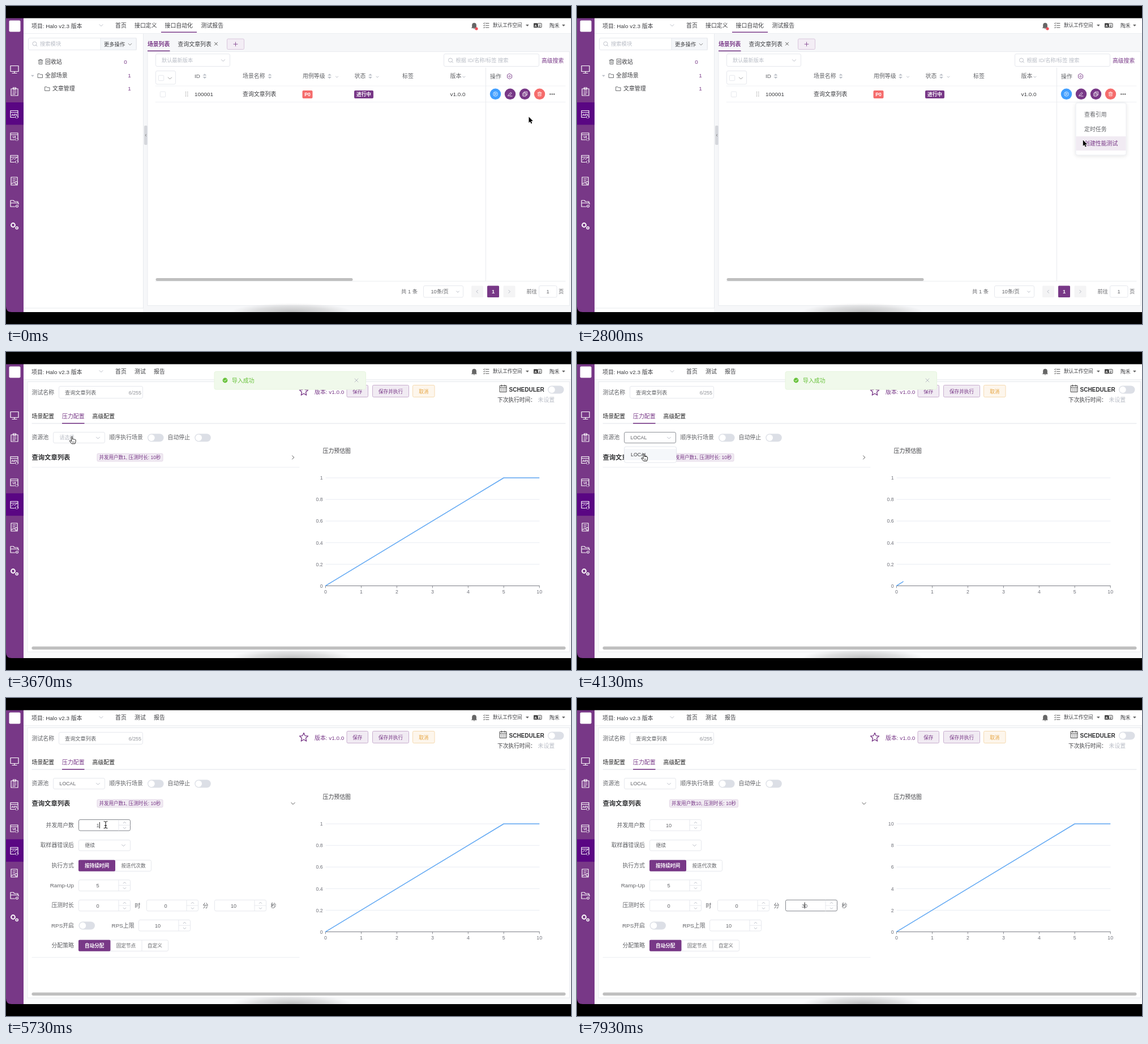
An HTML page that plays this animation: 998 by 561 pixels, repeating every 8 s.

```html
<!DOCTYPE html>
<html lang="zh-CN">
<head>
<meta charset="utf-8">
<title>性能测试</title>
<style>
html,body{margin:0;width:100%;height:100%;overflow:hidden;background:#fff}
svg{display:block;width:100vw;height:100vh}
text{font-family:"Liberation Sans","Noto Sans CJK SC","Noto Sans CJK JP","Noto Sans CJK",sans-serif;white-space:pre}
</style>
</head>
<body>
<svg id="stage" viewBox="0 0 998 561"></svg>
<script>
const LOOP = 8000, FPS = 15;
const PURPLE = '#783887', INK = '#3c3d40', GREY = '#606266', PALE = '#b9bdc6', EDGE = '#e6e8ed';

// Markup helpers
const T = (x, cy, s, o = {}) => {
  const z = o.z || 9.9;
  return `<text x="${x}" y="${(cy + z * .37).toFixed(2)}" font-size="${z}" fill="${o.f || INK}"` +
    ` font-weight="${o.w || 400}" text-anchor="${o.a || 'start'}"${o.id ? ` id="${o.id}"` : ''}>${s}</text>`;
};
const C = (x, cy, s, o = {}) => T(x, cy, s, { ...o, a: 'middle' });
const R = (x, y, w, h, fill, stroke = 'none', r = 0, id = '') =>
  `<rect x="${x}" y="${y}" width="${w}" height="${h}" rx="${r}" fill="${fill}" stroke="${stroke}" id="${id}"/>`;
const P = (d, stroke = GREY, w = 1, fill = 'none') =>
  `<path d="${d}" stroke="${stroke}" stroke-width="${w}" fill="${fill}" stroke-linejoin="round" stroke-linecap="round"/>`;
const O = (x, y, r, fill, stroke = 'none', w = 1) =>
  `<circle cx="${x}" cy="${y}" r="${r}" fill="${fill}" stroke="${stroke}" stroke-width="${w}"/>`;
const G = (id, s, extra = '') => `<g id="${id}" ${extra}>${s}</g>`;
const at = (x, y, s) => `<g transform="translate(${x} ${y})">${s}</g>`;
const H = (x1, x2, y, c = EDGE, w = 1) => P(`M${x1} ${y}H${x2}`, c, w);

const chevron = (x, y, dir = 'down', s = 3.2, c = PALE) => {
  const a = { down: 0, up: 180, left: 90, right: -90 }[dir];
  return `<path transform="translate(${x} ${y}) rotate(${a})" d="M${-s} ${-s / 2}L0 ${s / 2}L${s} ${-s / 2}" fill="none" stroke="${c}"/>`;
};
const caretDown = (x, y, c = '#555') => P(`M${x - 2.3} ${y - 1}h4.6l-2.3 2.6z`, c, .4, c);
const sorter = (x, y) => P(`M${x - 3} ${y - 1.3}h6l-3-2.8z`, PALE, .3, PALE) + P(`M${x - 3} ${y + 1.3}h6l-3 2.8z`, PALE, .3, PALE);
const lens = (x, y) => O(x - .5, y - .5, 3.5, 'none', PALE, .9) + P(`M${x + 2} ${y + 2}l2 2`, PALE);
const box = (x, y, w, h) => R(x + .5, y + .5, w - 1, h - 1, '#fff', EDGE, 2.5);
const check = (x, y) => R(x - 4.7, y - 4.7, 9.4, 9.4, '#fff', EDGE, 1.5);
const toggle = (x, cy) => R(x, cy - 7, 28.5, 14, '#dcdfe6', 'none', 7) + O(x + 7, cy, 5.7, '#fff');
const folder = (x, y) => P(`M${x - 4} ${y - 3.3}h3l1 1.2h4v5.6h-8z`, GREY, .9);
const bin = (x, y, c, k = 1) => at(x, y, `<g transform="scale(${k})">` +
  P('M-4-2.7H4M-1.5-2.7V-4.2H1.5V-2.7M-3-2.7V4H3V-2.7M-1-.6V2M1-.6V2', c, .9) + '</g>');
const button = (x, w, s, fill, edge, ink) => R(x + .5, 58.5, w - 1, 21, fill, edge, 2) + C(x + w / 2, 69.5, s, { z: 8.6, f: ink, w: 500 });
const stepper = (x, cy, val, id = '') => {
  const e = x + 71, c = x + 81.5;
  return R(x + .5, cy - 9.7, 91, 19.5, '#fff', EDGE, 2.5, id && id + 'Box') + P(`M${e} ${cy - 9}v18.5M${e} ${cy}H${x + 91}`, EDGE) +
    chevron(c, cy - 4.5, 'up', 2.5) + chevron(c, cy + 5, 'down', 2.5) +
    C(x + 34, cy + .3, val, { z: 9.2, f: GREY, id });
};

// Frame shared by both pages
function sidebar() {
  const win = P('M-7-6H6V5M-7-6V6H0M-7-3H6', '#fff', 1.2) + P('M3 3.5l-2 2 2 2M5 3.5l2 2-2 2', '#fff', 1);
  const tag = s => C(-.5, .8, s, { z: 6, f: '#fff', w: 700 });
  const icons = [
    P('M-7-6H7V4H-7zM0 4V7M-4 7H4', '#fff', 1.2),
    P('M-6-5H6V7H-6zM-2.5-7H2.5V-4H-2.5zM-3-1H3M-3 2H3M-3 4.5H1', '#fff', 1.2),
    win + tag('API'), win + tag('UI'), win + P('M-5 2l3-3 2 2 4-3', '#fff'),
    P('M-6-7H5V7H-6zM-3-4H2M-3-1H1M-3 2H0M-6 4H-2', '#fff', 1.2) + O(3, 3, 2.3, PURPLE, '#fff', 1.1),
    P('M-7-5.5H-2L0-3.5H6V-1M-7-5.5V5.5H1M-7-1H7V1', '#fff', 1.2) + O(4.5, 4.5, 2, 'none', '#fff', 1.2),
    O(-2.5, -1.5, 3.4, 'none', '#fff', 2) + O(4.2, 3.5, 2, 'none', '#fff', 1.6)
  ];
  return R(0, 21, 31, 519, PURPLE) + R(0, 170, 31, 39.5, '#5a0683', 'none', 0, 'active') +
    R(5.5, 25.5, 20, 20, '#fff', 'none', 2) + icons.map((s, i) => at(15, 111.5 + i * 39.5, s)).join('');
}

function header() {
  return R(31, 21, 967, 27.5, '#fff') + H(31, 998, 48.5, '#eceef1') +
    T(45, 35, '项目: Halo v2.3 版本') + chevron(168, 34) + T(193, 34.3, '首页') +
    G('navList', T(227, 34.3, '接口定义') + T(280.5, 34.3, '接口自动化', { w: 500 }) + T(344.5, 34.3, '测试报告') + R(274, 45.5, 63, 1.5, PURPLE)) +
    G('navPerf', T(227, 34.3, '测试') + T(261, 34.3, '报告')) +
    P('M823.5 37.5V33.5a3.5 3.5 0 0 1 7 0V37.5l.8 1.2h-8.6zM826 40h2', '#666', .8, '#666') +
    `<circle id="dot" cx="831" cy="40" r="2.6" fill="#f0505a"/>` +
    [30.5, 34.2, 38].map(y => P(`M843.5 ${y}l1 .9 1.2-1.8M847.5 ${y}h5.5`, '#555', 1)).join('') +
    T(860, 34.3, '默认工作空间', { z: 8.6 }) + caretDown(921, 34) +
    R(932, 30.2, 7, 8, '#444', 'none', .8) + R(939.4, 30.6, 6.6, 7.2, '#fff', '#444', .8) +
    C(935.5, 34.3, 'A', { z: 6, f: '#fff', w: 700 }) + C(942.7, 34.3, 'Z', { z: 6, w: 700 }) +
    T(960, 34.3, '陶禾', { z: 8.8 }) + caretDown(985, 34);
}

function listPage() {
  const tree = R(31, 49, 211, 491, '#fff') + box(39, 56, 192, 22) + R(167, 56.5, 63, 21, '#f5f7fa', EDGE) +
    lens(51, 67) + T(60, 67, '搜索模块', { z: 9.3, f: PALE }) + T(173, 67.3, '更多操作', { z: 9.3 }) + chevron(219, 67.5, 'down', 3.2, '#888') +
    bin(61, 98.5, GREY) + T(69, 98.3, '回收站') + C(211, 98.3, '0', { f: PURPLE }) +
    caretDown(47, 123, PALE) + folder(60.5, 123) + T(69, 122.8, '全部场景') + C(218, 122.8, '1', { f: PURPLE }) +
    folder(73, 146) + T(82, 145.8, '文章管理') + C(218, 145.8, '1', { f: PURPLE });
  const tabs = T(250, 67, '场景列表', { f: PURPLE, w: 700, z: 9.8 }) + R(250, 78.5, 39.5, 1.5, PURPLE) +
    T(303.5, 67.5, '查询文章列表', { w: 500 }) + P('M368.5 64.2l5 5M373.5 64.2l-5 5', '#555') +
    R(390.5, 58, 30, 18.5, '#f3edf5', '#d8c6dc', 2) + P('M402 67.3h7M405.5 63.8v7', PURPLE, .8);
  const heads = [[333, 'ID', 351], [418, '场景名称', 466], [524, '用例等级', 571.5, 584.5], [615.5, '状态', 643.5, 656], [700, '标签'], [784.5, '版本', 0, 809]]
    .map(([x, s, k, v]) => T(x, 123.8, s, { f: GREY, w: 500 }) + (k ? sorter(k, 123.8) : '') + (v ? chevron(v, 125, 'down', 2.3) : '')).join('');
  const dots = [0, 1, 2].map(i => O(317.5, 152 + i * 3.3, .8, '#999') + O(320.8, 152 + i * 3.3, .8, '#999')).join('');
  const actions = ['#409eff', PURPLE, PURPLE, '#f56c6c'].map((c, i) => O(864.5 + i * 26, 155.3, 9.7, c)).join('') +
    O(864.5, 155.3, 3.8, 'none', '#fff', .8) + P('M863.5 153.6v3.4l2.6-1.7z', '#fff', .7) +
    P('M887.5 156.8l4-4.5 1.6 1.5-4 4.5-2 .4zM890 159h4', '#fff', .8) +
    P('M915-3', 'none') + R(913, 153.4, 5.5, 5.5, 'none', '#fff', .5) + P('M915 153v-1.6h5.6v5.6h-1.8M914.5 156h2.5', '#fff', .8) +
    bin(942.5, 155.3, '#fff', .85) + [961.3, 964.7, 968.1].map(x => O(x, 155.5, 1.1, '#333')).join('');
  const foot = T(698, 503.8, '共 1 条', { z: 9.3, f: GREY }) + box(737, 493, 71, 21.5) + T(750.5, 503.8, '10条/页', { z: 9.2, f: GREY }) + chevron(798, 504, 'down', 2.6) +
    R(822, 493.5, 21, 20.5, '#f4f4f5', 'none', 1.5) + chevron(832.3, 503.8, 'left', 2.8) +
    R(850, 493.5, 21, 20.5, PURPLE, 'none', 1.5) + C(860.5, 503.8, '1', { f: '#fff', w: 700, z: 9.2 }) +
    R(878.5, 493.5, 21, 20.5, '#f4f4f5', 'none', 1.5) + chevron(889, 503.8, 'right', 2.8) +
    T(919.5, 503.8, '前往', { z: 9.2, f: GREY }) + box(941, 493, 32.5, 21.5) + C(957, 503.8, '1', { z: 9.2, f: GREY }) + T(976, 503.8, '页', { z: 9.2, f: GREY });
  return R(31, 49, 967, 491, '#f6f7f9') + tree + P('M242.5 49V533', '#e8eaee') + H(31, 242, 533, '#e8eaee') +
    R(244, 211, 6, 34, '#d5d7dc', 'none', 2) + chevron(247, 228, 'left', 2, '#888') + tabs +
    R(250, 80.5, 745.5, 448, '#fff', '#e9ebef') +
    box(264, 84, 132, 23) + T(275, 95.7, '默认最新版本', { z: 9.2, f: PALE }) + chevron(383.5, 96) +
    box(773, 84, 169, 23) + lens(785.5, 96) + T(794.5, 95.7, '根据 ID/名称/标签 搜索', { z: 9.2, f: PALE }) + T(946, 96.3, '高级搜索', { z: 9.8, f: PURPLE, w: 500 }) +
    box(264, 114, 36, 24.5) + check(274, 127) + chevron(289.5, 127.3, 'down', 3.4, '#999') + heads +
    H(264, 988, 141, '#f0f2f5') + H(264, 988, 169.5, '#eff1f4') +
    check(277, 155.8) + dots + T(333, 155.7, '100001') + T(418, 155.7, '查询文章列表') +
    R(523.5, 149, 18, 14, '#f56c6c', 'none', 2) + C(532.5, 156, 'P0', { z: 8.6, f: '#fff', w: 700 }) +
    R(615, 149, 34, 14, PURPLE, 'none', 2) + C(632, 156, '进行中', { z: 8.6, f: '#fff', w: 700 }) + T(784.5, 155.7, 'v1.0.0') +
    P('M847.5 109V485', '#e8eaee') + T(855, 124, '操作', { f: GREY, w: 500 }) +
    P('M889.5 119.5l4 2.3v4.6l-4 2.3-4-2.3v-4.6z', PURPLE, .9) + O(889.5, 124.1, 1.5, 'none', PURPLE, .8) + actions +
    R(264.5, 480, 348, 5, '#bfbfbf', 'none', 2.5) + H(264, 988, 485.5, '#eceef1') + foot +
    G('menu', R(881, 171, 89, 92, '#fff', '#eaecf0', 3).replace('<rect', '<rect filter="url(#soft)"') +
      R(881.5, 230, 88, 25, '#f1ebf3', 'none', 0, 'hover') +
      ['查看引用', '定时任务'].map((s, i) => T(896, 191.5 + i * 25.6, s, { f: GREY })).join('') + T(896, 242.7, '创建性能测试', { f: GREY, id: 'item' }));
}

function form() {
  const labels = ['并发用户数', '取样器错误后', '执行方式', 'Ramp-Up', '压测时长', 'RPS开启', '分配策略'];
  const pick = (y, a, wa, rest) => R(128.5, y, 129 + rest, 19.5, '#fff', EDGE, 2.5) + R(128, y - .3, wa, 20, PURPLE, 'none', 2) +
    C(128 + wa / 2, y + 9.9, a, { z: 8.6, f: '#fff', w: 700 });
  return labels.map((s, i) => T(120, 224.3 + i * 35.35, s, { a: 'end', f: GREY })).join('') +
    stepper(128, 224.3, '1', 'users') + R(0, 219, 1, 11, '#222', 'none', 0, 'usersCaret') +
    box(128, 250, 92, 20) + T(139.5, 260.2, '继续', { z: 8.8, f: GREY }) + chevron(207.5, 260) +
    pick(286, '按持续时间', 65, -1) + C(225, 296, '按迭代次数', { z: 8.6, f: GREY }) +
    stepper(128, 330.6, '5') +
    stepper(128, 366, '0') + T(227.5, 366, '时', { f: GREY }) + stepper(248, 366, '0') + T(347.5, 366, '分', { f: GREY }) +
    stepper(368, 366, '10', 'secs') + R(401.7, 360.5, 1, 11, '#222', 'none', 0, 'secsCaret') + T(467.5, 366, '秒', { f: GREY }) +
    toggle(128.5, 401.5) + T(186.5, 401.2, 'RPS上限', { f: GREY }) + stepper(234, 401.2, '10') +
    pick(427, '自动分配', 56.5, 29) + P('M240 427.5v18.5', EDGE) + C(212, 437, '固定节点', { z: 8.6, f: GREY }) + C(263, 437, '自定义', { z: 8.6, f: GREY });
}

function chart() {
  const o = { z: 8.7, f: '#6e7079' }, step = 62.95;
  let s = T(559.5, 174, '压力预估图');
  for (let i = 0; i < 6; i++) {
    const y = 412.5 - i * 38.1;
    s += T(559.5, y, '0', { ...o, a: 'end', id: 'y' + i });
    if (i) s += H(565, 942, y, '#e4e8f0', .8);
  }
  ['0', '1', '2', '3', '4', '5', '10'].forEach((n, i) => {
    const x = 564.5 + i * step;
    s += P(`M${x} 412.5v3.5`, '#6e7079', .8) + C(x, 422.3, n, o);
  });
  return s + H(564.5, 942, 412.5, '#6e7079', .9) +
    `<clipPath id="sweep"><rect id="sweepBox" x="563" y="210" height="210"/></clipPath>` +
    `<g clip-path="url(#sweep)">${P('M564.5 412.3L879.2 222H942', '#61a8f3', 1.5)}</g>`;
}

function perfPage() {
  let star = 'M';
  for (let i = 0; i < 10; i++) {
    const r = i % 2 ? 3.7 : 8, a = i * Math.PI / 5;
    star += `${i ? 'L' : ''}${(526 + r * Math.sin(a)).toFixed(1)} ${(69.6 - r * Math.cos(a)).toFixed(1)}`;
  }
  return R(31, 49, 967, 491, '#f9fafb') + R(38, 52.5, 957.5, 476.5, '#fff', '#e9ebef') +
    T(45.5, 71, '测试名称', { f: GREY }) + box(93, 60, 149, 22) + T(104, 71.3, '查询文章列表', { z: 9.2, f: GREY }) + T(239, 71.3, '6/255', { z: 8.9, f: '#909399', a: 'end' }) +
    P(star + 'z', PURPLE, 1.3) + T(545, 70, '版本: v1.0.0', { f: PURPLE, w: 500 }) +
    button(601.5, 38.5, '保存', '#f1ebf3', '#c9afcf', PURPLE) + button(647, 65, '保存并执行', '#f1ebf3', '#c9afcf', PURPLE) + button(718, 39.5, '取消', '#fdf6ec', '#f5dab1', '#e6a23c') +
    P('M872.5 59.5h11.5v11h-11.5zM872.5 62.8h11.5M875.5 58v2.5M881 58v2.5M875 65.3h1M878 65.3h1M881 65.3h1M875 68h1M878 68h1M881 68h1', '#444', 1) +
    T(888.5, 66, 'SCHEDULER', { z: 10, w: 700, f: '#303133' }) + toggle(957, 66.5) +
    T(868, 84, '下次执行时间：', { z: 9.7 }) + T(939.5, 84, '未设置', { f: PALE }) +
    T(45.5, 113, '场景配置', { w: 500, f: '#222' }) + T(99, 113, '压力配置', { w: 500, f: PURPLE }) + T(152.5, 113, '高级配置', { w: 500, f: '#222' }) +
    H(46, 988, 126, '#dfe2e8') + R(99, 125, 39.5, 1.6, PURPLE) +
    T(45.5, 150.5, '资源池', { f: GREY }) + R(83.5, 141.5, 91, 19, '#fff', EDGE, 2.5, 'poolBox') + T(94.5, 151, '', { z: 8.8, id: 'pool' }) + chevron(162.5, 151.5) +
    T(182.5, 150.5, '顺序执行场景', { f: GREY }) + toggle(250, 151.3) + T(285.5, 150.5, '自动停止', { f: GREY }) + toggle(333.3, 151.3) +
    T(45.5, 186, '查询文章列表', { z: 11.3, w: 700, f: '#303133' }) +
    R(161, 179.2, 116, 13.6, '#f1ebf3', '#e3d6e6', 2, 'badgeBox') + C(219, 186, '', { z: 8.55, f: PURPLE, w: 500, id: 'badge' }) +
    G('arrow', chevron(0, 0, 'right', 3.4, '#555')) +
    `<clipPath id="fold"><rect id="foldBox" x="31" y="203" width="500"/></clipPath>` + `<g clip-path="url(#fold)">${form()}</g>` +
    G('foldLine', H(46, 518, 0, '#eceef2')) + chart() + R(45.5, 519.5, 943, 5.5, '#bfbfbf', 'none', 2.7) +
    G('options', R(83.5, 167, 92, 28, '#fff', '#e4e7ed', 3) + R(84, 171, 91, 20, '#f5f7fa') + T(95, 181, 'LOCAL', { z: 8.8 })) +
    G('tip', R(70.5, 136.5, 65, 23.5, '#303133', 'none', 3) + C(103, 148.5, '查询文章列表', { z: 8.5, f: '#fff', w: 500 })) +
    G('toast', R(368, 34.5, 267.5, 31.5, '#f0f9eb', '#e6f5de', 3) + O(387, 50, 4.4, '#67c23a') + P('M385 50l1.5 1.6 2.7-3', '#fff', 1) +
      T(399, 50, '导入成功', { f: '#67c23a' }) + P('M616 47l6 6M622 47l-6 6', PALE));
}

const stage = document.getElementById('stage');
stage.innerHTML = `<defs><filter id="soft" x="-20%" y="-20%" width="140%" height="140%"><feDropShadow dx="0" dy="1.5" stdDeviation="3" flood-opacity=".1"/></filter>
  <radialGradient id="glow"><stop offset="0" stop-color="#777" stop-opacity=".45"/><stop offset=".6" stop-color="#999" stop-opacity=".28"/><stop offset="1" stop-color="#aaa" stop-opacity="0"/></radialGradient></defs>` +
  R(0, 0, 998, 561, '#fff') + G('list', listPage()) + G('frame', header() + sidebar()) + G('perf', perfPage()) +
  '<ellipse cx="505" cy="540" rx="108" ry="16" fill="url(#glow)"/>' +
  G('cursor',
    G('point', `<path d="M0 0V10.4L2.4 8.2 4 12 5.7 11.3 4.1 7.6H7.3Z" fill="#000" stroke="#fff" stroke-width="1.2" paint-order="stroke"/>`) +
    G('hand', P('M-1.2 1.2a1.1 1.1 0 0 1 2.2 0V5q1-.9 2 .1 1-.6 1.9.3 1.3-.5 1.7.8V9.3L5.4 12.8H-.4L-4 8.6q-.6-1.5.8-1.5l2 1.5z', '#222', 1, '#fff') + P('M1.2 9v2M3.4 9v2', '#222', .7)) +
    G('beam', P('M-3-6Q0-6 0-4.4V4.4Q0 6-3 6M3-6Q0-6 0-4.4M0 4.4Q0 6 3 6M-1.6 1.4H1.6', '#222', 1.1))) +
  R(0, 0, 998, 21.5, '#000') + R(0, 540, 998, 21, '#000') + '<path d="M0 530Q0 540 10 540V541H0Z"/>';

const el = {};
stage.querySelectorAll('[id]').forEach(n => { if (n.id) el[n.id] = n; });
const show = (id, on) => el[id].setAttribute('display', on ? 'inline' : 'none');
const set = (id, attrs) => { for (const k in attrs) el[id].setAttribute(k, attrs[k]); };
const ramp = (t, a, b) => Math.max(0, Math.min(1, (t - a) / (b - a)));
const within = (t, a, b) => t >= a && t < b;

// Pointer path: time, x, y
const path = [[0, 923.5, 195.5], [200, 944, 175], [400, 963, 158], [533, 966, 156], [1600, 966, 156], [1667, 963.5, 169],
  [1867, 942, 232], [2000, 936, 241], [2733, 936, 241], [2933, 810, 228], [3133, 609, 206], [3400, 270, 168], [3600, 124, 151],
  [3667, 116.5, 149], [3800, 116.5, 149], [4067, 118, 179], [4200, 118, 180], [4667, 123, 187.5], [4733, 140, 200], [4800, 176, 223.7],
  [6267, 176, 223.7], [6467, 355, 342], [6600, 403, 371], [6733, 403, 371], [6800, 402, 371], [LOOP, 402, 371]];
function pointer(t) {
  let i = 1;
  while (i < path.length - 1 && path[i][0] < t) i++;
  const [a, x, y] = path[i - 1], [b, u, v] = path[i], p = ramp(t, a, b);
  return [x + (u - x) * p, y + (v - y) * p];
}

function draw(t) {
  const list = t < 2860, perf = t >= 3260;
  show('list', list); show('frame', list || perf); show('perf', perf);
  show('navList', list); show('navPerf', perf); show('dot', list);
  set('active', { y: list ? 170 : 249.3 });

  const m = ramp(t, 260, 530);
  set('menu', { opacity: m, transform: `translate(0 ${171 * (1 - (.8 + .2 * m))}) scale(1 ${.8 + .2 * m})` });
  show('menu', m > 0);
  show('hover', t >= 1860);
  set('item', { fill: t >= 1860 ? PURPLE : GREY });

  const rise = ramp(t, 3260, 3460) - ramp(t, 4330, 4530);
  set('toast', { opacity: rise, transform: `translate(0 ${-14 * (1 - rise)})` });
  show('options', within(t, 3930, 4190));
  show('tip', within(t, 4530, 4730));
  const chosen = t >= 4130;
  el.pool.textContent = chosen ? 'LOCAL' : '请选择';
  set('pool', { fill: chosen ? GREY : PALE });
  set('poolBox', { stroke: within(t, 3860, 4730) ? '#909399' : EDGE });

  const open = ramp(t, 4667, 4800), late = t >= 7260;
  set('foldBox', { height: 254 * open });
  set('foldLine', { transform: `translate(0 ${203.3 + 254.3 * open})` });
  set('arrow', { transform: `translate(507 186) rotate(${open > 0 ? 90 : 0})` });
  el.badge.textContent = `并发用户数${late ? 10 : 1}, 压测时长: 10秒`;
  set('badge', { x: late ? 224 : 219 });
  set('badgeBox', late ? { x: 163.5, width: 121 } : { x: 161, width: 116 });

  const typing = within(t, 5730, 7260);
  el.users.textContent = t >= 6060 ? '10' : '1';
  set('usersBox', { stroke: typing ? '#84878d' : EDGE });
  set('usersCaret', { x: t >= 6060 ? 166.7 : 164.8 });
  show('usersCaret', typing && !within(t, 6330, 6530) && !within(t, 6790, 7060));
  el.secs.textContent = t >= 7660 ? '30' : t >= 7530 ? '0' : '10';
  set('secsBox', { stroke: late ? '#84878d' : EDGE });
  show('secsCaret', late);

  const start = late ? 7260 : t >= 4110 ? 4112 : 3000;
  set('sweepBox', { width: 1.5 + 378 * ramp(t, start, start + 667) });
  for (let i = 0; i < 6; i++) el['y' + i].textContent = late ? i * 2 : +(i * .2).toFixed(1);

  const [x, y] = pointer(t);
  set('cursor', { transform: `translate(${x.toFixed(1)} ${y.toFixed(1)})` });
  const hand = within(t, 1730, 2790) || within(t, 3590, 4730);
  const beam = within(t, 4730, 5990) || within(t, 6530, 7530);
  show('hand', hand); show('beam', beam);
  show('point', !hand && !beam && !within(t, 5990, 6320) && t < 7530);
}

function tick() {
  const t = performance.now() % LOOP;
  draw(Math.min(LOOP * FPS / 1000 - 1, Math.floor((t + 4) * FPS / 1000)) * 1000 / FPS);
  requestAnimationFrame(tick);
}
tick();
</script>
</body>
</html>
```
